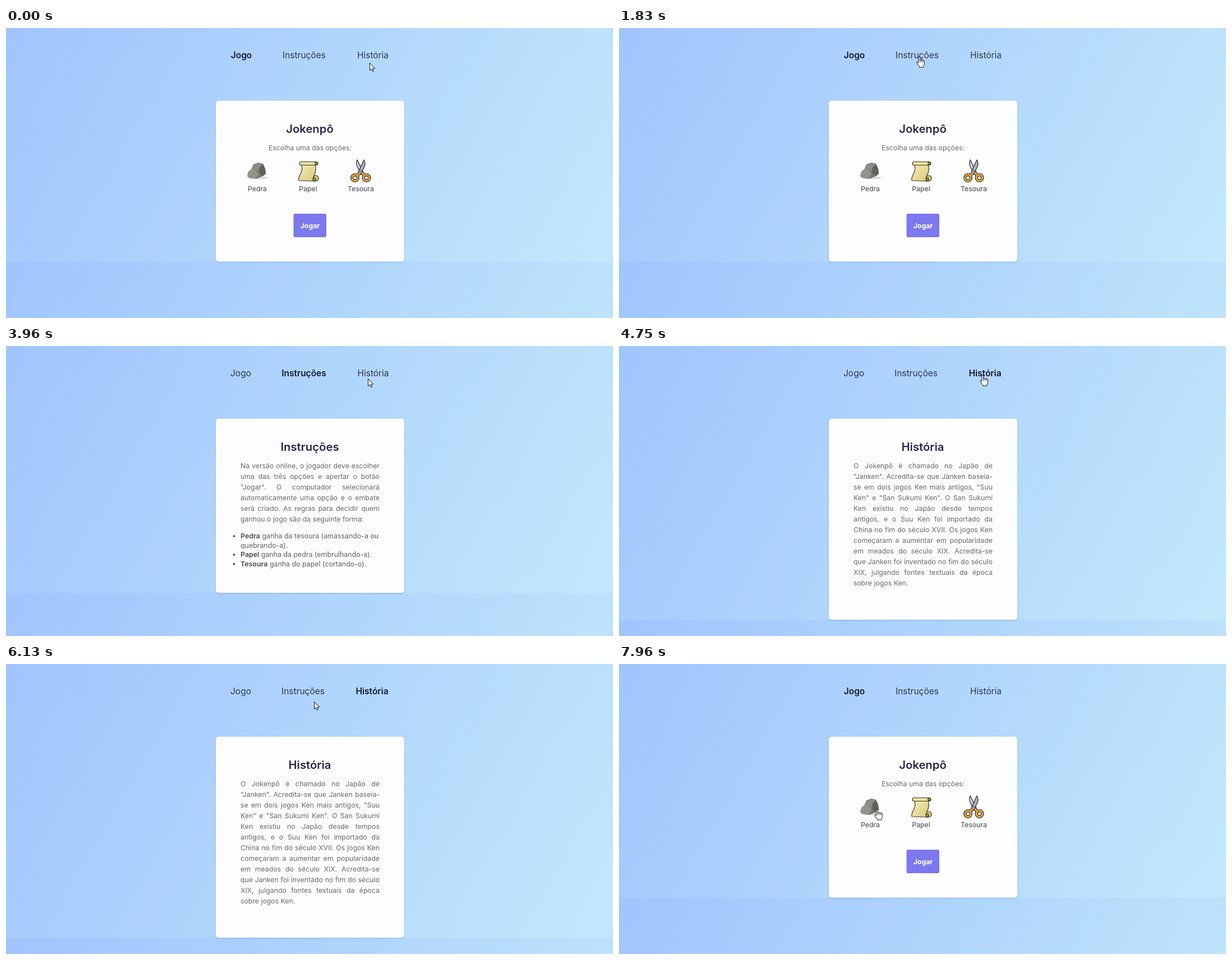
These frames come from a looping animation (1082x517 px, 8 s). An HTML page:

```html
<!DOCTYPE html>
<html lang="pt">
<head>
<meta charset="utf-8">
<title>Jokenpô</title>
<style>
  html, body { margin: 0; width: 100%; height: 100%; overflow: hidden; }
  #stage { width: 1082px; height: 517px; background: linear-gradient(120deg, #a1c4fd, #c2e9fb); }
  svg { display: block; font: 12.3px Inter, sans-serif; }
  .nav { font-size: 15.5px; font-weight: 400; fill: #2f3750; }
  .nav .on { font-weight: 600; fill: #14192b; }
  .mid { text-anchor: middle; }
  .title { font-size: 20.3px; font-weight: 600; fill: #29294c; text-anchor: middle; }
  .soft { fill: #686870; }
  .list { font-size: 12.4px; fill: #606068; }
  .list tspan { font-weight: 600; fill: #4b4b53; }
  .label { fill: #44444c; }
  .card { fill: #fdfdff; filter: drop-shadow(0 1px 1.5px rgba(40, 70, 130, .25)); }
  .line { display: flex; justify-content: space-between; white-space: nowrap; height: 19px; line-height: 19px; color: #686870; }
  .line.last { justify-content: flex-start; gap: .28em; }
</style>
</head>
<body>
<div id="stage">
<svg width="1082" height="517" viewBox="0 0 1082 517">
  <defs>
    <linearGradient id="paper" x2="1" y2="1">
      <stop offset="0" stop-color="#f4edbb"/><stop offset="1" stop-color="#d8c878"/>
    </linearGradient>
    <linearGradient id="stone" x2="1" y2="1">
      <stop offset="0" stop-color="#a5a69d"/><stop offset="1" stop-color="#66675f"/>
    </linearGradient>
  </defs>

  <g class="nav mid" id="nav">
    <text y="54">Jogo</text><text y="54">Instruções</text><text y="54">História</text>
  </g>
  <rect class="card" id="card" x="374" y="129.6" width="336" rx="5"/>

  <g class="page">
    <text class="title" x="541.5" y="187">Jokenpô</text>
    <text class="soft mid" x="542" y="217.5">Escolha uma das opções:</text>

    <g id="rock">
      <ellipse cx="450" cy="267" rx="17" ry="2.5" fill="#d9d8d2"/>
      <path d="M430 264l2-8 5-4 4-9 9-3 8 2 4 9 1 9-5 4-12 5-13-2z" fill="url(#stone)"/>
      <path d="M441 243l9-3 8 2-6 7-8 4-7 0z" fill="#8b8c83"/>
      <path d="M452 249l6-7 4 9 1 9-5 4-7-5z" fill="#5f605a"/>
      <path d="M432 256l5-3 7 0 7 6-5 10-13-2-3-3z" fill="#92938a"/>
      <path d="M444 253l7 6-5 10M452 249l-1 10 7 5" fill="none" stroke="#6a6b64" stroke-width=".8"/>
    </g>

    <g id="scroll" stroke="#3d371e" stroke-width="1.2" stroke-linejoin="round">
      <path d="M526 243q4 7-1 17-4 7-3 12l27 1q-3-5 1-12 4-9 1-17z" fill="url(#paper)"/>
      <path d="M526 238.5h26q4 0 4 3t-4 3h-26q-3 0-3-3t3-3z" fill="#ece2a2"/>
      <circle cx="553" cy="241.5" r="2.3" fill="#b9a75c"/>
      <path d="M548 267q0-4 4-4t5 4-4 6h-6" fill="#d8c878"/>
      <circle cx="549.5" cy="270" r="2.6" fill="#a9964e"/>
    </g>

    <g id="scissors" stroke="#30343a" stroke-linejoin="round">
      <path d="M626 235q-3 7 1 14l6 12 4-4z" fill="#cbd2d8" stroke-width="1.3"/>
      <path d="M638 235q4 7 0 14l-6 12-4-4z" fill="#aab3bb" stroke-width="1.3"/>
      <g fill="none">
        <g stroke-width="5.6"><circle cx="622" cy="267" r="5.3"/><circle cx="642.5" cy="267" r="5.3"/><path d="M626 263l5-5m8 5l-5-5"/></g>
        <g stroke="#e2a33d" stroke-width="3.2"><circle cx="622" cy="267" r="5.3"/><circle cx="642.5" cy="267" r="5.3"/><path d="M626 263l5-5m8 5l-5-5"/></g>
      </g>
      <circle cx="632.2" cy="254.5" r="1.2" fill="#e9edf0" stroke-width=".8"/>
    </g>

    <g class="label mid">
      <text x="448" y="291">Pedra</text><text x="538.5" y="291">Papel</text><text x="632.5" y="291">Tesoura</text>
    </g>
    <rect x="512.5" y="331" width="58.5" height="42" rx="3" fill="#7c78ee"/>
    <text class="mid" x="542" y="356.5" fill="#fff" font-weight="700">Jogar</text>
  </g>

  <g class="page">
    <text class="title" x="541.5" y="187">Instruções</text>
    <foreignObject class="prose" x="418" y="204" width="248" height="120"/>
    <g class="list">
      <circle cx="406.5" cy="339" r="2.1"/><circle cx="406.5" cy="372" r="2.1"/><circle cx="406.5" cy="388.7" r="2.1"/>
      <text x="418" y="343"><tspan>Pedra</tspan> ganha da tesoura (amassando-a ou</text>
      <text x="418" y="359.5">quebrando-a).</text>
      <text x="418" y="376"><tspan>Papel</tspan> ganha da pedra (embrulhando-a).</text>
      <text x="418" y="392.7"><tspan>Tesoura</tspan> ganha do papel (cortando-o).</text>
    </g>
  </g>

  <g class="page">
    <text class="title" x="541.5" y="187">História</text>
    <foreignObject class="prose" x="418" y="204" width="248" height="235"/>
  </g>

  <g id="status">
    <path d="M0 503h99q2 0 2 2v12H0z" fill="#2b2c30"/>
    <text x="4" y="514" fill="#f2f2f4" style="font:9px 'Open Sans',sans-serif">127.0.0.1:5500/history</text>
  </g>

  <path id="arrow" d="M.5 .5v13l3-2.8 2 4.8 2-.9-2-4.6h4.2z" fill="#fff" stroke="#111" stroke-linejoin="round"/>
  <g id="hand" stroke="#111" stroke-linejoin="round" stroke-linecap="round">
    <path d="M-1.3 11V1.8q0-1.5 1.3-1.5T1.4 1.8V7q0-1.3 1.4-1.3T4.2 7q0-1 1.3-1T6.8 7.5q0-.9 1.2-.9T9.3 8.2V13q0 2-1.5 3.6V19H.6v-1.6L-3.8 12q-1-1.6 0-2.2t2.5 1.2z" fill="#fff"/>
    <path d="M1.4 7v3M4.2 7v3M6.8 7.5v2.7" fill="none" stroke-width=".8"/>
  </g>
</svg>
</div>

<script>
const LOOP = 8000;
const $ = id => document.getElementById(id);
const show = (el, on) => { el.style.display = on ? '' : 'none'; };

const prose = [
  `Na versão online, o jogador deve escolher
uma das três opções e apertar o botão
"Jogar". O computador selecionará
automaticamente uma opção e o embate
será criado. As regras para decidir quem
ganhou o jogo são da seguinte forma:`,
  `O Jokenpô é chamado no Japão de
"Janken". Acredita-se que Janken baseia-
se em dois jogos Ken mais antigos, "Suu
Ken" e "San Sukumi Ken". O San Sukumi
Ken existiu no Japão desde tempos
antigos, e o Suu Ken foi importado da
China no fim do século XVII. Os jogos Ken
começaram a aumentar em popularidade
em meados do século XIX. Acredita-se
que Janken foi inventado no fim do século
XIX, julgando fontes textuais da época
sobre jogos Ken.`
];

// Justified lines: words spread between both margins, last line ragged.
document.querySelectorAll('.prose').forEach((box, i) => {
  const lines = prose[i].split('\n');
  lines.forEach((text, n) => {
    const line = document.createElement('div');
    line.className = n === lines.length - 1 ? 'line last' : 'line';
    for (const word of text.split(' ')) {
      const span = document.createElement('span');
      span.textContent = word;
      line.append(span);
    }
    box.append(line);
  });
});

const pages = [
  { bottom: 416.5, nav: [419.5, 531.5, 654] },
  { bottom: 440, nav: [418.5, 531, 654.5] },
  { bottom: 488, nav: [418.5, 529.5, 652.5] }
];
const pageEls = document.querySelectorAll('.page');
const links = [...$('nav').children];
const linkHalf = [18, 40, 29];

// time, x, y of the pointer tip
const path = [
  [0, 648, 62], [130, 648, 62], [450, 650, 52], [850, 643, 50], [1210, 597, 48],
  [1560, 537, 50], [2050, 533, 52], [2750, 623, 112], [3300, 640, 105],
  [3960, 645, 58], [4300, 648, 52], [5600, 648, 52], [6200, 545, 68],
  [6780, 416, 48], [7130, 416, 48], [7650, 440, 165], [7960, 460, 259], [8000, 460, 259]
];

function pointerAt(t) {
  const i = path.findIndex(key => key[0] > t);
  const [t0, x0, y0] = path[i - 1], [t1, x1, y1] = path[i];
  const u = (t - t0) / (t1 - t0), e = u * u * (3 - 2 * u);
  return [Math.round(x0 + (x1 - x0) * e), Math.round(y0 + (y1 - y0) * e)];
}

function isClickable(x, y, nav, page) {
  if (y > 38 && y < 57) return pages[nav].nav.some((c, i) => Math.abs(x - c) < linkHalf[i]);
  return page === 0 && y > 234 && y < 294 && [448, 539, 632].some(c => Math.abs(x - c) < 20);
}

function pageAt(t, home) {
  return t < 1950 || t >= home ? 0 : t < 4650 ? 1 : 2;
}

function render(t) {
  const nav = pageAt(t, 7000), page = pageAt(t, 7130);
  const { bottom } = pages[page];
  $('stage').style.backgroundSize = `100% ${bottom + 0.5}px`;
  $('card').setAttribute('height', bottom - 129.6);
  pageEls.forEach((el, i) => show(el, i === page));
  links.forEach((el, i) => {
    el.setAttribute('x', pages[nav].nav[i]);
    el.setAttribute('class', i === nav ? 'on' : '');
  });
  show($('status'), t >= 450 && t < 1450);

  const [x, y] = pointerAt(t);
  const hand = isClickable(x, y, nav, page);
  show($('hand'), hand);
  show($('arrow'), !hand);
  $(hand ? 'hand' : 'arrow').setAttribute('transform', `translate(${x} ${y})`);
}

const start = performance.now();
function tick() {
  render((performance.now() - start) % LOOP);
  requestAnimationFrame(tick);
}
tick();
</script>
</body>
</html>
```
